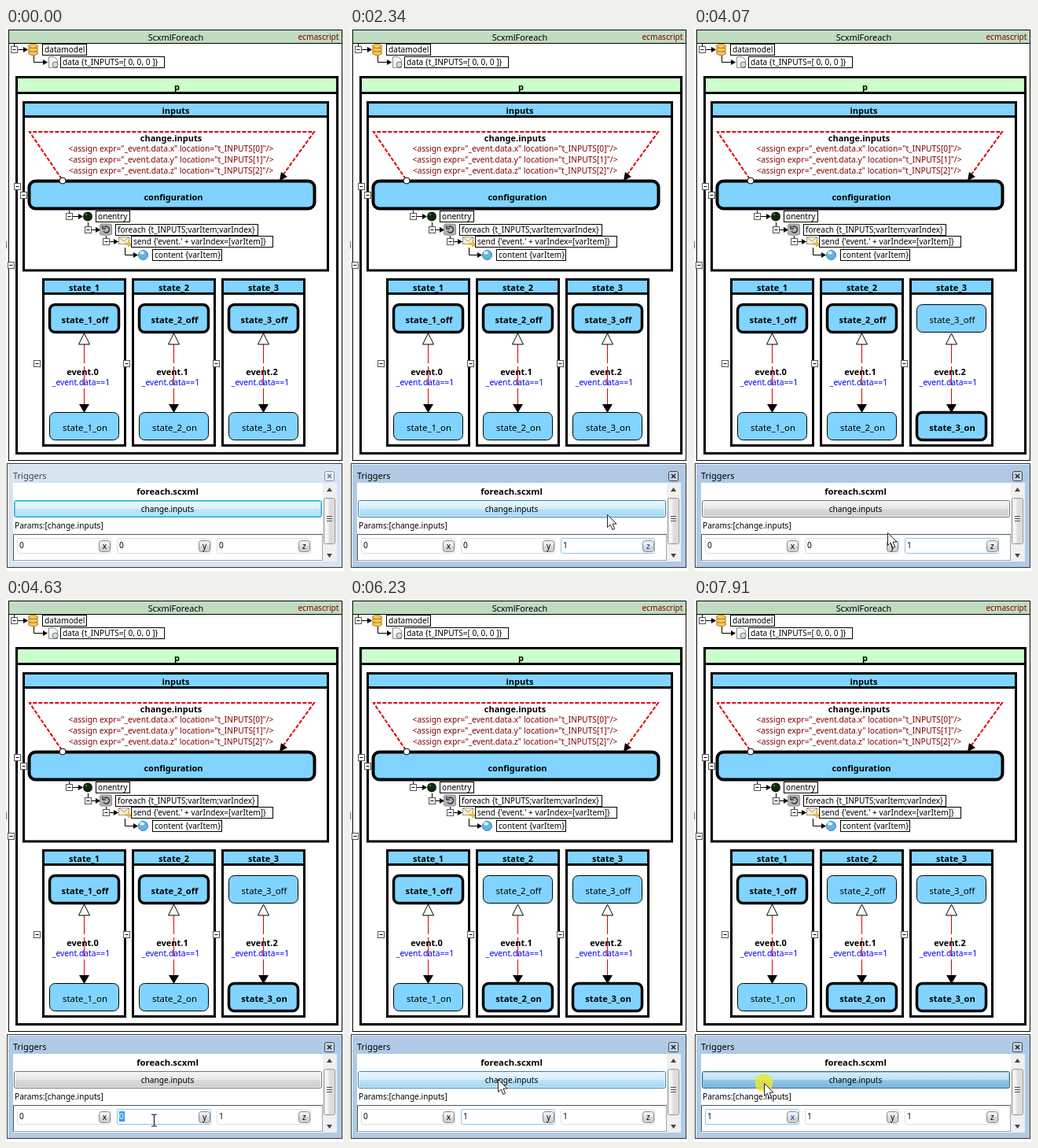
Recreate the animation shown at these times as an HTML page. Size 430 by 690 pixels, loop 7990 ms.

```html
<!DOCTYPE html>
<html lang="en">
<head>
<meta charset="utf-8">
<title>Statechart foreach</title>
<style>
html, body { margin: 0; width: 100%; height: 100%; overflow: hidden; background: #fff; }
svg { display: block; font: 10.15px "Noto Sans", "Open Sans", sans-serif; }
.bold { font-weight: 700; font-size: 11px; }
.mid { text-anchor: middle; }
.thin { fill: none; stroke: #000; }
</style>
</head>
<body>
<svg id="stage" width="430" height="690" viewBox="0 0 430 690">
  <defs id="defs"></defs>
  <g id="chart"></g>
  <g id="panel"></g>
  <circle id="halo" fill="#f0e62e"/>
  <path id="arrow" d="M0 0V16L3.7 12.6L6.4 19L9.2 17.8L6.5 11.6H11.5Z" fill="#fff" stroke="#222" stroke-linejoin="round"/>
  <path id="beam" d="M-3.5 -7.5H-1L0 -6.5L1 -7.5H3.5M0 -6.5V6.5M-3.5 7.5H-1L0 6.5L1 7.5H3.5" fill="none" stroke="#222" stroke-width="1.2"/>
</svg>
<script>
const LOOP = 7990;
const BLUE = '#80d4ff';
const RED = '#e00000';
const $ = id => document.getElementById(id);
const set = (id, attrs) => {
  for (const key in attrs) $(id).setAttribute(key, attrs[key]);
};

const rect = (x, y, w, h, fill, stroke = 'none', extra = '') =>
  `<rect x="${x}" y="${y}" width="${w}" height="${h}" fill="${fill}" stroke="${stroke}" ${extra}/>`;
const path = (d, extra = 'class="thin"') => `<path d="${d}" ${extra}/>`;
const text = (x, y, str, extra = '') =>
  `<text x="${x}" y="${y}" ${extra}>${str.replace(/</g, '&lt;')}</text>`;
const title = (x, y, str, extra = '') => text(x, y, str, `class="bold mid" ${extra}`);
const gradient = (id, ...stops) =>
  `<linearGradient id="${id}" x2="0" y2="1">${stops.map(([at, color]) =>
    `<stop offset="${at}" stop-color="${color}"/>`).join('')}</linearGradient>`;

const toggle = (x, y) =>
  rect(x - 4, y - 4, 8, 8, '#fff', '#555') + path(`M${x - 2} ${y}h4`);

// Elbow line, arrow head and framed label of one tree entry
function entry(x, top, y, tip, labelX, labelW, str, icon, hasToggle = true) {
  return path(`M${x} ${top}V${y}H${tip - 4}`) +
    path(`M${tip} ${y}l-6 -3.5v7z`, '') +
    (hasToggle ? toggle(x, y) : '') + icon +
    rect(labelX + .5, y - 7, labelW, 14, '#fff', '#000') +
    text(labelX + 3, y + 3.5, str);
}

function container(x, y, w, h, headH, fill, name) {
  return rect(x, y, w, h, '#fff', '#000', 'stroke-width="3"') +
    rect(x + 1.5, y + 1.5, w - 3, headH, fill) +
    title(x + w / 2, y + headH - .5, name) +
    path(`M${x} ${y + headH + 3}h${w}`, 'stroke="#000" stroke-width="3"');
}

const stateBox = (id, x, y, name) =>
  rect(x, y, 88, 35, BLUE, '#000', `rx="7" id="${id}"`) +
  text(x + 45, y + 23, name, `class="mid" id="${id}-text"`);

function region(n) {
  const x = 47.5 + 114 * (n - 1), c = x + 52;
  return container(x, 319.5, 104, 211, 15, BLUE, `state_${n}`) +
    path(`M${c} 402V479`, `fill="none" stroke="${RED}" stroke-dasharray="24 4"`) +
    path(`M${c} 388l7 14h-14z`, 'fill="#fff" stroke="#000"') +
    path(`M${c} 489l-6.5 -11h13z`, '') +
    title(c - 2, 441, `event.${n - 1}`) +
    text(c - 4, 454, '_event.data==1', 'class="mid" fill="#00f" style="font-size:10.3px"') +
    stateBox(`off${n}`, x + 8, 351.5, `state_${n}_off`) +
    stateBox(`on${n}`, x + 8, 488.5, `state_${n}_on`) +
    toggle(x - 8, 426.5);
}

const disc = y => `<ellipse cx="34.5" cy="${y}" rx="6" ry="2.5" fill="#f6c95c" stroke="#b17a1c"/>`;
const icons = {
  store: rect(28.5, 22, 12, 11, '#e5a63a') + disc(32) + disc(27.5) + disc(23),
  page: path('M54.5 36.5h7l4 4v10h-11z', 'fill="#f4f4f4" stroke="#888"') +
    '<circle cx="62.5" cy="46.5" r="3.5" fill="#cfe3cf" stroke="#678"/>',
  entry: '<circle cx="104" cy="239.5" r="6" fill="#0d260d"/><circle cx="102" cy="237" r="1.5" fill="#486848"/>',
  repeat: rect(119.5, 249, 15, 14, '#b4b4b4', '#888', 'rx="2"') +
    path('M124 258a4 4 0 1 0 1 -5M123 251v4h4', 'fill="none" stroke="#333" stroke-width="1.5"'),
  mail: rect(143.5, 265.5, 13, 9, '#f6eedb', '#a99a78') +
    path('M144 266l6 5l6 -5', 'fill="none" stroke="#a99a78"') +
    path('M151 273h4v-3l5 5l-5 4v-3h-4z', 'fill="#f0b83a"'),
  content: '<circle cx="174.5" cy="288.5" r="6" fill="#63b4e4" stroke="#327ba8"/><ellipse cx="173" cy="285.5" rx="3" ry="2" fill="#d8f1ff"/>'
};

const assign = (y, axis, i) =>
  text(210, y, `<assign expr="_event.data.${axis}" location="t_INPUTS[${i}]"/>`,
    'class="mid" fill="#800000" style="font-size:10.25px"');

$('defs').innerHTML =
  gradient('gray', [0, '#f4f4f4'], [.48, '#e8e8e8'], [.5, '#dadada'], [1, '#cdcdcd']) +
  gradient('ready', [0, '#ecf8fd'], [.48, '#d9f1fb'], [.5, '#c0e7f8'], [1, '#b0e0f6']) +
  gradient('hover', [0, '#eaf6fd'], [.48, '#d5eefb'], [.5, '#bde5fc'], [1, '#a2d5f0']) +
  gradient('down', [0, '#d6edf8'], [.48, '#bfe2f3'], [.5, '#93cbe9'], [1, '#6fb3d8']);

$('chart').innerHTML =
  rect(3.5, 2.5, 424, 547, '#fff', '#000') +
  rect(3.5, 2.5, 424, 17, '#c0dcc0', '#000') +
  text(216, 16, 'ScxmlForeach', 'class="mid" style="font-size:10.9px"') +
  text(423.5, 15, 'ecmascript', 'text-anchor="end" fill="#800000"') +
  entry(10.5, 20, 27.5, 28, 46, 56, 'datamodel', icons.store) +
  entry(35.5, 35, 43.5, 53, 69, 132, 'data {t_INPUTS=[ 0, 0, 0 ]}', icons.page, false) +
  container(13.5, 62.5, 408, 478, 17, '#ccffcc', 'p') +
  container(22.5, 94.5, 387, 213.5, 15, BLUE, 'inputs') +
  path('M71 192L30 132H392L350 190', `fill="none" stroke="${RED}" stroke-width="2" stroke-dasharray="5 2"`) +
  title(210, 143.5, 'change.inputs') +
  assign(157, 'x', 0) + assign(171, 'y', 1) + assign(185, 'z', 2) +
  rect(29.5, 194.5, 363, 35, BLUE, '#000', 'rx="8" id="config"') +
  title(213, 219, 'configuration') +
  '<circle cx="72" cy="194" r="4" fill="#fff" stroke="#000"/>' +
  path('M348 194l2 -11l8 6z', '') +
  entry(80.5, 232, 239.5, 98, 114, 43, 'onentry', icons.entry) +
  entry(104.5, 247, 256.5, 120, 139, 181, 'foreach {t_INPUTS;varItem;varIndex}', icons.repeat) +
  entry(127.5, 264, 271.5, 143, 159, 180, "send {'event.' + varIndex=[varItem]}", icons.mail) +
  entry(151.5, 279, 288.5, 168, 186, 88, 'content {varItem}', icons.content, false) +
  [1, 2, 3].map(region).join('') +
  toggle(14.5, 201.5) + toggle(22.5, 212.5) + toggle(6.5, 301.5) +
  path('M.5 271v9', 'stroke="#777"');

const field = (x, axis) =>
  rect(x + .5, 648.5, 119, 19, '#fff', '#dde', `rx="1" id="box-${axis}"`) +
  rect(x + 3, 651, 7, 13, '#3399ff', 'none', `id="sel-${axis}"`) +
  text(x + 3, 661, '0', `id="val-${axis}"`) +
  rect(x + 104.5, 651.5, 14, 14, 'url(#gray)', '#888', 'rx="3"') +
  text(x + 111.5, 662, axis, `class="mid" id="key-${axis}"`);

$('panel').innerHTML =
  rect(1.5, 553.5, 426, 132, '#b9d1ea', '#333', 'id="frame"') +
  path('M2.5 685V554.5H427', 'stroke="#f4f9ff" fill="none"') +
  text(9, 573, 'Triggers', 'id="caption" style="font-size:11px"') +
  rect(405.5, 563.5, 12, 12, '#dce6f2', '#555', 'rx="2" id="close"') +
  path('M409 567l5 5m0 -5l-5 5', 'stroke-width="1.6" id="cross"') +
  rect(9, 578, 412, 100, '#fff') +
  title(205.5, 592.5, 'foreach.scxml', 'style="font-size:11.3px"') +
  rect(10.5, 600.5, 391, 21, 'url(#gray)', '#707070', 'rx="2" id="button"') +
  rect(11.5, 601.5, 389, 19, 'none', '#fff', 'rx="1" id="glow" opacity=".8"') +
  text(205.5, 614.5, 'change.inputs', 'class="mid"') +
  text(11, 636, 'Params:[change.inputs]') +
  rect(9.5, 643.5, 393, 33, '#fff', '#a0a0a0') +
  path('M9.5 677V643.5H403', 'fill="none" stroke="#555"') +
  field(14, 'x') + field(141, 'y') + field(268, 'z') +
  path('M278.5 651v13', 'class="thin" id="caret"') +
  rect(403, 578, 18, 100, '#f0f0f0') +
  path('M411.5 584l3.5 5h-7z M411.5 673l3.5 -5h-7z', 'fill="#444"') +
  rect(404.5, 597.5, 14, 58, '#dcdcdc', '#979797', 'rx="2"') +
  rect(405.5, 598.5, 5, 56, '#f3f3f3') +
  path('M408 620.5h7m-7 3h7m-7 3h7', 'stroke="#555"');

const bursts = [[130, 7], [920, 4], [1390, 1], [1780, 10], [2810, 6], [3670, 10],
  [4470, 10], [5270, 8], [6230, 10], [7030, 10], [7910, 1]];
const stepped = t => {
  const burst = bursts.filter(([start]) => start <= t).pop();
  if (!burst) return 0;
  return burst[0] + 80 * Math.min(burst[1] - 1, Math.floor((t - burst[0]) / 80));
};

// Pointer hot spot: time, x, y
const track = [[0, 336, 720], [130, 334, 685], [610, 317, 659], [1780, 317, 659],
  [2500, 328, 612], [3670, 328, 612], [4390, 188, 662], [4790, 188, 662],
  [5190, 188, 610], [6230, 188, 610], [6710, 87, 656], [7110, 87, 656], [7750, 89, 615], [LOOP, 89, 615]];
function pointer(t) {
  const i = track.findIndex(key => key[0] > t);
  const [t0, x0, y0] = track[i - 1], [t1, x1, y1] = track[i];
  const u = (t - t0) / (t1 - t0), ease = u * u * (3 - 2 * u);
  return [x0 + (x1 - x0) * ease, y0 + (y1 - y0) * ease];
}

const within = (t, a, b) => t >= a && t < b;
const clicks = [[920, 1080], [2810, 2970], [4470, 4630], [5430, 5590], [6710, 6870], [7910, LOOP]];
const presses = [[2810, 2970], [5430, 5590], [7910, LOOP]];
const inputs = {
  x: { left: 14, focus: 6790, type: 7110, sent: LOOP },
  y: { left: 141, focus: 4550, type: 4790, sent: 5590 },
  z: { left: 268, focus: 920, type: 1080, sent: 2970 }
};
const looks = {
  gray: ['#707070', '#fff'], ready: ['#2fa4d8', '#3fc8f4'],
  hover: ['#3c7fb1', '#f0faff'], down: ['#2c628b', '#9fc5da']
};

function paintState(id, active) {
  set(id, { 'stroke-width': active ? 3.5 : 1 });
  set(id + '-text', { style: active ? 'font-weight:700;font-size:11.2px' : 'font-size:11.4px' });
}

function render(t) {
  const [px, py] = pointer(t);
  const active = t >= 920;
  const overField = within(py, 645, 672);

  set('frame', { fill: active ? '#b0cae6' : '#d7e4f2' });
  set('caption', { fill: active ? '#000' : '#444' });
  set('close', { fill: active ? '#c3d3e6' : '#e6eef7', stroke: active ? '#444' : '#8a929c' });
  set('cross', { stroke: active ? '#222' : '#777' });

  const look = presses.some(p => within(t, ...p)) ? 'down'
    : within(py, 600, 622) ? 'hover' : active ? 'gray' : 'ready';
  set('button', { fill: `url(#${look})`, stroke: looks[look][0] });
  set('glow', { stroke: looks[look][1] });

  const focused = Object.keys(inputs)
    .filter(k => t >= inputs[k].focus)
    .sort((a, b) => inputs[b].focus - inputs[a].focus)[0];
  for (const [axis, { left, focus, type, sent }] of Object.entries(inputs)) {
    const selected = within(t, focus, type);
    const hovered = overField && within(px, left, left + 120);
    set('box-' + axis, { stroke: axis === focused ? '#8fc4e4' : hovered ? '#b5d8ec' : '#dcdde3' });
    set('sel-' + axis, { opacity: +selected });
    set('val-' + axis, { fill: selected ? '#fff' : '#000' });
    $('val-' + axis).textContent = t >= type ? '1' : '0';
    set('key-' + axis, { fill: within(t, type, sent) ? '#0a3cc8' : '#000' });
  }
  set('caret', { opacity: +within(t, 1080, 1390) });

  [Infinity, 5590, 2970].forEach((switched, i) => {
    paintState('off' + (i + 1), t < switched);
    paintState('on' + (i + 1), t >= switched);
  });
  set('config', { 'stroke-width': within(t, 2970, 3050) ? 1 : 4 });

  const click = clicks.find(c => within(t, ...c));
  set('halo', { cx: px, cy: py, r: overField ? 10 : 11.5, opacity: click ? .8 : 0 });
  const place = `translate(${Math.round(px) + .5} ${Math.round(py) + .5})`;
  set('arrow', { transform: place, opacity: +!overField });
  set('beam', { transform: place, opacity: +overField });
}

const began = performance.now();
function tick() {
  render(stepped((performance.now() - began) % LOOP));
  requestAnimationFrame(tick);
}
tick();
</script>
</body>
</html>
```
